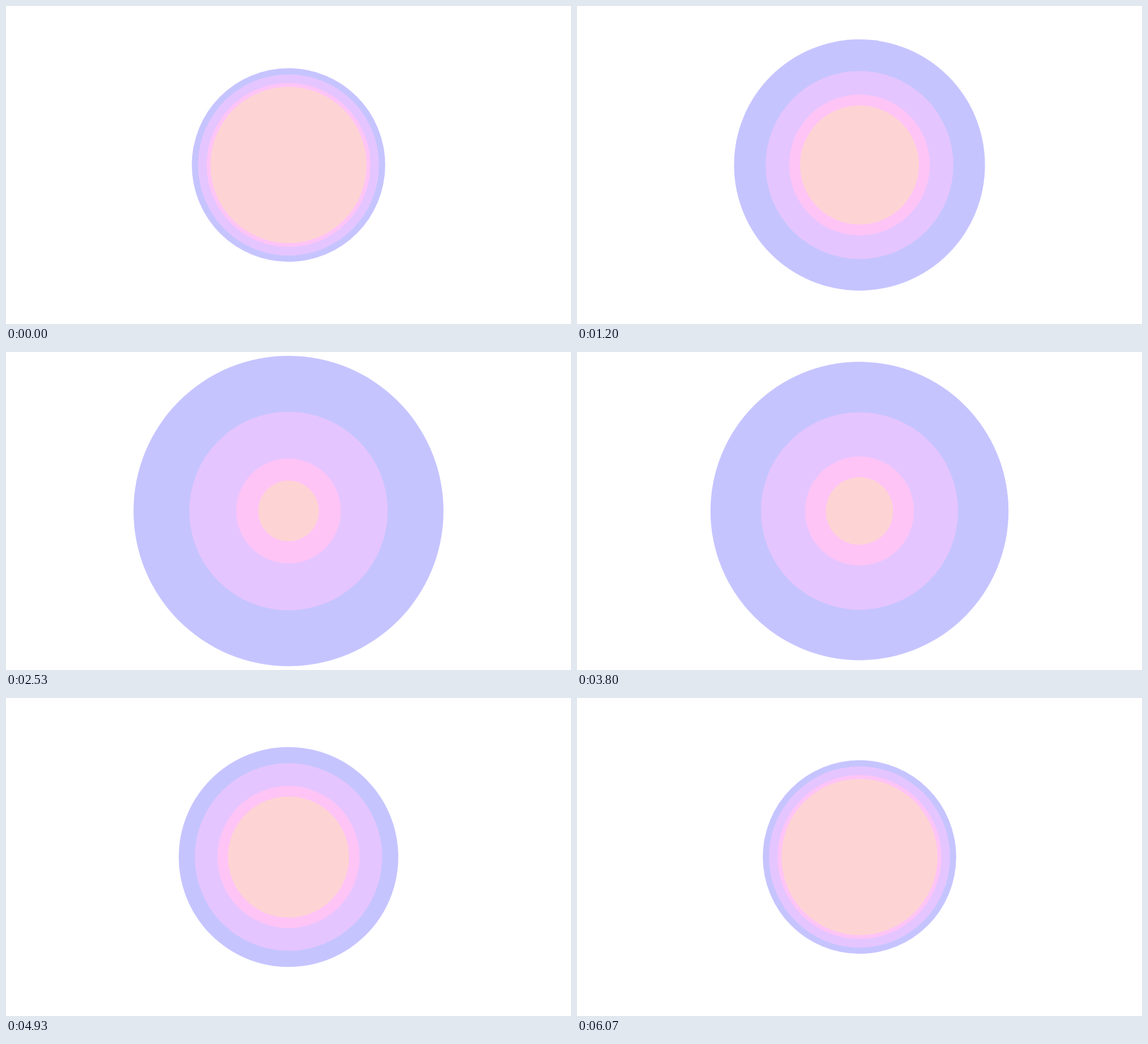
Recreate the animation shown at these times as an HTML page. Size 998 by 561 pixels, loop 6.41 s.

```html
<!DOCTYPE html>
<html lang="en">
<head>
<meta charset="utf-8">
<title>Breathing rings</title>
<style>
  html, body { margin: 0; width: 100%; height: 100%; overflow: hidden; background: #fff; }
  svg { display: block; width: 100vw; height: 100vh; }
</style>
</head>
<body>
<svg id="stage" viewBox="0 0 998 561"></svg>
<script>
const LOOP = 6410;
const SHRINK_START = 3200;

const smooth = u => u * u * (3 - 2 * u);
const sine = u => (1 - Math.cos(Math.PI * u)) / 2;

// Cubic bezier easing with handles (x1, 0) and (x2, 1).
const bezier = (x1, x2) => u => {
  let low = 0, high = 1;
  for (let i = 0; i < 24; i++) {
    const s = (low + high) / 2, r = 1 - s;
    const x = 3 * x1 * s * r * r + 3 * x2 * s * s * r + s * s * s;
    if (x < u) low = s; else high = s;
  }
  return smooth(low);
};

const inner = { grow: { ease: smooth, duration: 2900 }, shrink: { ease: smooth, duration: 2880 } };
const outer = { grow: { ease: bezier(0.17, 0.65), duration: 2900 }, shrink: { ease: sine, duration: 2500 } };

const rings = [
  { color: '#c6c4ff', rest: 170.8, open: 277.8, motion: outer },
  { color: '#e5c5ff', rest: 159.8, open: 175.8, motion: inner },
  { color: '#fec4f6', rest: 144.5, open: 90, motion: inner },
  { color: '#fdd4d3', rest: 137.8, open: 49.5, motion: inner }
];

const stage = document.getElementById('stage');
for (const ring of rings) {
  ring.node = document.createElementNS('http://www.w3.org/2000/svg', 'circle');
  ring.node.setAttribute('cx', 499);
  ring.node.setAttribute('cy', 280.5);
  ring.node.setAttribute('fill', ring.color);
  stage.appendChild(ring.node);
}

const progress = ({ ease, duration }, time) => ease(Math.min(1, Math.max(0, time / duration)));

function render(time) {
  for (const { node, rest, open, motion } of rings) {
    const amount = time < SHRINK_START
      ? progress(motion.grow, time)
      : 1 - progress(motion.shrink, time - SHRINK_START);
    node.setAttribute('r', (rest + (open - rest) * amount).toFixed(2));
  }
}

const start = performance.now();
function tick() {
  render((performance.now() - start) % LOOP);
  requestAnimationFrame(tick);
}
tick();
</script>
</body>
</html>
```
